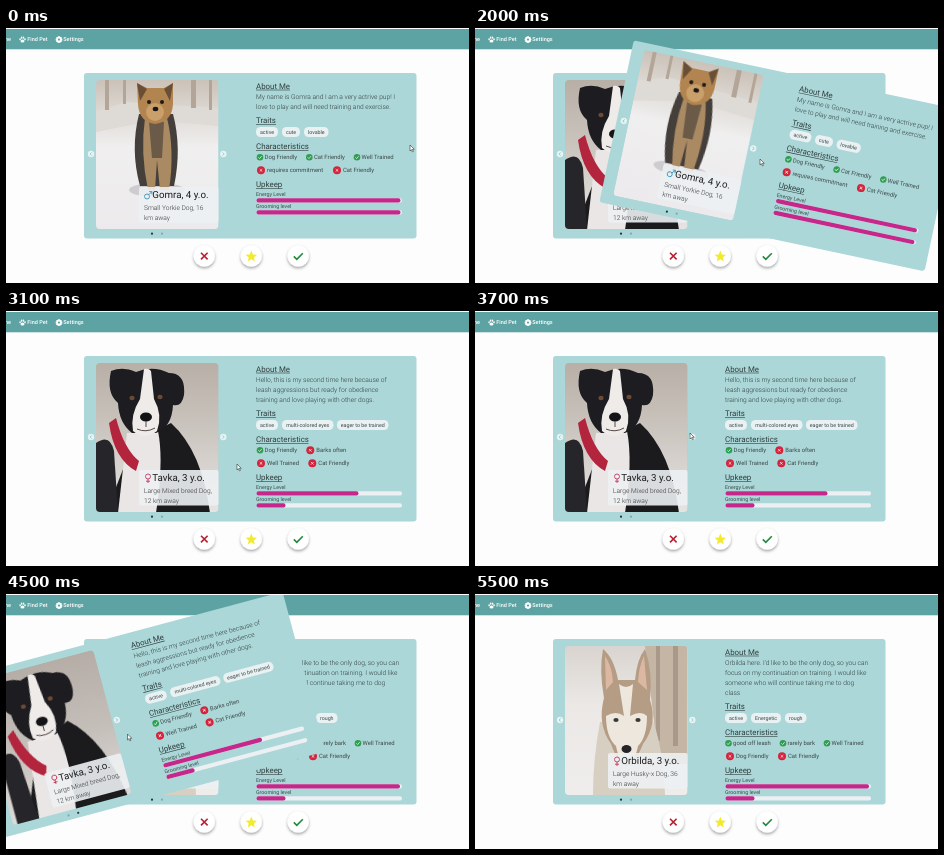
Animation, 463 px wide and 255 px high, one loop 5700 ms. Source, as an HTML page:

```html
<!DOCTYPE html>
<html lang="en">
<head>
<meta charset="utf-8">
<title>Pet cards</title>
<style>
  html, body { margin: 0; width: 100%; height: 100%; overflow: hidden; background: #fdfdfd; }
  svg { display: block; width: 463px; height: 255px; }
  text { font-family: Roboto, Arial, sans-serif; fill: #3b4848; text-rendering: geometricPrecision; }
  .nav { font-size: 5.5px; font-weight: 500; fill: #fff; }
  .head { font-size: 7.9px; fill: #2f3d3d; }
  .body { font-size: 6.63px; font-weight: 300; fill: #2f3d3d; }
  .pill { font-size: 5.3px; }
  .fact { font-size: 5.9px; }
  .level { font-size: 5.3px; }
  .name { font-size: 9.75px; fill: #1c1c1c; }
  .info { font-size: 6.63px; font-weight: 300; fill: #333; }
</style>
</head>
<body>
<svg id="stage" viewBox="0 0 463 255" xmlns="http://www.w3.org/2000/svg"></svg>
<script>
const LOOP = 5700, STEP = 100;

const pets = [
  {
    id: 'a', name: 'Gomra', age: 4, male: true, info: ['Small Yorkie Dog, 16', 'km away'],
    about: ['My name is Gomra and I am a very actrive pup! I', 'love to play and will need training and exercise.'],
    traits: [['active', 250, 22], ['cute', 276, 18], ['lovable', 298, 24.5]],
    facts: [
      [['Dog Friendly', 254, 1], ['Cat Friendly', 303.3, 1], ['Well Trained', 351, 1]],
      [['requires commitment', 255, 0], ['Cat Friendly', 331, 0]]
    ],
    levels: [144, 144]
  },
  {
    id: 'b', name: 'Tavka', age: 3, info: ['Large Mixed breed Dog,', '12 km away'],
    about: ['Hello, this is my second time here because of', 'leash aggressions but ready for obedience', 'training and love playing with other dogs.'],
    traits: [['active', 250, 22], ['multi-colored eyes', 276, 51.5], ['eager to be trained', 331, 51.5]],
    facts: [
      [['Dog Friendly', 254, 1], ['Barks often', 304.3, 0]],
      [['Well Trained', 255, 0], ['Cat Friendly', 306.3, 0]]
    ],
    levels: [102, 29]
  },
  {
    id: 'c', name: 'Orbilda', age: 3, info: ['Large Husky-x Dog, 36', 'km away'],
    about: ["Orbilda here. I'd like to be the only dog, so you can", 'focus on my continuation on training. I would like', 'someone who will continue taking me to dog', 'class'],
    traits: [['active', 250, 22], ['Energetic', 276, 30], ['rough', 310, 21.5]],
    facts: [
      [['good off leash', 253.5, 1], ['rarely bark', 308, 1], ['Well Trained', 352, 1]],
      [['Dog Friendly', 255, 0], ['Cat Friendly', 307, 0]]
    ],
    levels: [143.5, 29]
  }
];

// Motion tables: time followed by values, linear in between.
const cursorPath = [
  [0, 404, 117], [300, 388, 124], [600, 371, 128], [700, 340, 124], [800, 260, 110], [900, 183, 104],
  [1000, 188, 110], [1100, 225, 128], [1200, 252, 138], [1300, 233, 137], [1600, 227, 134], [1800, 227, 134],
  [1900, 234, 134], [2000, 285, 131], [2100, 355, 125], [2200, 409, 121], [2400, 418, 118], [2600, 395, 125],
  [2800, 310, 140], [3000, 237, 148], [3100, 231, 153], [3300, 228, 148], [3500, 219, 130], [3700, 215, 122],
  [3800, 215, 122], [3900, 226, 132], [4100, 246, 146], [4300, 234, 149], [4400, 226, 149], [4500, 121.5, 140],
  [4700, 85, 128], [5000, 50, 70], [5200, 16, 10]
];
const throwRight = [
  [1800, 0, 0, 0], [1900, 6, 0, 4], [2000, 60, 0, 12], [2100, 160, -20, 17], [2200, 258.5, -44.5, 17],
  [2300, 312, -56, 17], [2400, 358, -66, 17], [2500, 415, -78, 17]
];
const throwLeft = [
  [4200, 0, 0, 0], [4300, -1, 1, -1], [4400, -5, 4, -6], [4500, -107, -7, -15], [4600, -190, -20, -17],
  [4800, -295, -44, -17], [5000, -370, -62, -17], [5200, -430, -78, -17]
];
const slidePath = [[3800, 0], [3900, -32], [4000, -72], [4100, -99], [4200, -122]];

const text = (cls, x, y, str, extra = '') => `<text class="${cls}" x="${x}" y="${y}" ${extra}>${str}</text>`;
const rect = (x, y, w, h, r, fill) => `<rect x="${x}" y="${y}" width="${w}" height="${h}" rx="${r}" fill="${fill}"/>`;
const oval = (x, y, rx, ry, fill) => `<ellipse cx="${x}" cy="${y}" rx="${rx}" ry="${ry}" fill="${fill}"/>`;
const shape = (d, fill) => `<path d="${d}" fill="${fill}"/>`;
const line = (d, color, w) => `<path d="${d}" fill="none" stroke="${color}" stroke-width="${w}"/>`;
const fade = (id, ...stops) => `<linearGradient id="${id}" x2="0" y2="1">` +
  stops.map(([o, c]) => `<stop offset="${o}" stop-color="${c}"/>`).join('') + '</linearGradient>';

const blackDog =
  shape('M128 130L165 112Q196 140 204 202H100Z', '#1b1a1d') +
  shape('M121 122L152 120Q158 150 150 202H112Z', '#e9e6e5') +
  shape('M90 132Q104 122 108 140L112 202H90Z', '#26252a') +
  shape('M103 112L110 107Q118 138 133 150L130 160Q108 148 103 112Z', '#b3243d') +
  shape('M105 60Q117 55 130 61Q147 54 163 62Q180 62 178 84Q176 96 167 94Q166 116 150 122H126Q113 112 112 92Q100 82 105 60Z', '#1d1c20') +
  shape('M138 58Q143 57 145 60L148 88Q157 104 151 120Q139 130 127 120Q124 104 134 88Z', '#eeebe9') +
  oval(126, 87, 2.6, 2.2, '#6b4a35') + oval(154, 86, 2.6, 2.2, '#6b4a35') +
  oval(140, 106, 6, 4.5, '#141316') + line('M140 110V116M131 118Q140 122 149 117', '#55484a', 1);

const photos = {
  a: rect(90, 52, 122.5, 149, 0, 'url(#skyA)') +
    shape('M90 84L120 74L212 80V98L150 92L90 104Z', '#dedad5') +
    shape('M99 52h4v30h-4zM117 52h3v24h-3zM185 52h5v28h-5zM203 52h3v30h-3z', '#b3a698') +
    oval(151, 162, 28, 7, '#cfccd0') +
    shape('M133 86Q124 122 134 158H168Q176 120 167 86Z', '#453f3b') +
    shape('M139 90Q134 124 142 162H149L151 132L154 162H163Q169 122 161 90Z', '#a98a63') +
    shape('M143 94H158L156 130H146Z', '#6b5a48') +
    shape('M131 55L141 60H158L167 55L167 76Q166 94 149 96Q133 94 132 76Z', '#b18450') +
    shape('M131 55L141 61L134 73ZM167 55L158 61L164 73Z', '#6a4f38') +
    oval(149, 84, 9, 9, '#c9a06a') +
    oval(143, 74, 2, 2, '#211a17') + oval(156, 74, 2, 2, '#211a17') + oval(149.5, 81, 2.8, 2.2, '#1b1718'),
  b: rect(90, 52, 122.5, 149, 0, 'url(#skyB)') + blackDog,
  b2: rect(90, 52, 122.5, 149, 0, 'url(#skyB2)') + `<g transform="translate(4 2)">${blackDog}</g>`,
  c: rect(90, 52, 122.5, 149, 0, 'url(#skyC)') +
    shape('M170 52H212V170H184Z', '#c5b5a5') +
    shape('M181 52h4v95h-4zM198 52h5v100h-5z', '#a9998a') +
    shape('M125 128Q118 165 118 201H190Q188 150 176 122Z', '#d8cfc3') +
    shape('M128 55Q139 64 143 86H160Q162 65 170 55Q178 78 175 106Q183 130 168 150Q160 170 152 172Q143 170 136 150Q122 130 129 104Q124 76 128 55Z', '#b49d84') +
    shape('M130 62Q137 72 138 88L131 96ZM169 62Q164 72 163 88L172 96Z', '#dcb8a3') +
    shape('M144 90Q151 96 158 90L155 122Q166 116 172 122Q172 143 163 152Q160 168 152 170Q144 168 141 152Q131 143 131 122Q141 116 149 122Z', '#eee7de') +
    oval(141, 126, 2.6, 2, '#3a3837') + oval(163, 126, 2.6, 2, '#3a3837') +
    oval(151.5, 155, 5, 4, '#262326')
};

function badge(x, y, good) {
  const mark = good
    ? line(`M${x - 1.6} ${y}l1.2 1.3 2.1-2.5`, '#dff3e4', .8)
    : line(`M${x - 1.3} ${y - 1.3}l2.6 2.6m0-2.6l-2.6 2.6`, '#fbe3e6', .8);
  const r = good ? 3.3 : 4;
  return oval(x, y, r, r, good ? '#2f9e50' : '#d3243c') + mark;
}

function arrow(x, dir) {
  return oval(x, 126, 3.2, 3.2, '#e6f3f3') + line(`M${x - dir * .7} 124.4l${dir * 1.6} 1.6l${-dir * 1.6} 1.6`, '#8fb9b9', .7);
}

function heading(str, y, w) {
  return text('head', 250, y, str) + rect(250, y + 1.2, w, .6, 0, '#2f3d3d');
}

function gender(male) {
  return male
    ? `<circle cx="141" cy="168.5" r="2.5" fill="none" stroke="#3d94b5" stroke-width=".9"/>` + line('M142.8 166.7L145.8 163.7M143.2 163.6H145.9V166.3', '#3d94b5', .9)
    : `<circle cx="142" cy="165.5" r="2.5" fill="none" stroke="#c23a5e" stroke-width=".9"/>` + line('M142 168V172M140 170.2H144', '#c23a5e', .9);
}

function card(p) {
  const shift = (p.about.length - 2) * 10;
  const strip = p.id === 'b' ? photos.b + `<g transform="translate(122.5 0)">${photos.b2}</g>` : photos[p.id];
  const details =
    heading('Traits', 95, 20) +
    p.traits.map(([s, x, w]) => rect(x, 99, w, 10, 4.5, '#e9f1f2') + text('pill', x + w / 2, 105.8, s, 'text-anchor="middle"')).join('') +
    heading('Characteristics', 121, 52.5) +
    p.facts.map((row, i) => row.map(([s, x, ok]) => {
      const y = 129.3 + i * 13;
      return badge(x, y, ok) + text('fact', x + (ok ? 4.6 : 6), y + 2, s);
    }).join('')).join('') +
    heading('Upkeep', 159, 26.5) +
    ['Energy Level', 'Grooming level'].map((s, i) => {
      const y = 168.3 + i * 12;
      return text('level', 250, y, s) + rect(250.5, y + 1.9, 145.5, 4.2, 2, '#edf0f3') +
        rect(250.5, y + 1.9, p.levels[i], 4.2, 2, '#c5288a');
    }).join('');
  return `<g id="card-${p.id}">` + rect(78, 45, 332.5, 165.5, 3, '#acd7d8') +
    `<g clip-path="url(#frame)"><g id="strip-${p.id}" filter="url(#soft)">${strip}</g></g>` +
    rect(133, 159, 79.5, 35.5, 2, 'rgba(238,241,243,.9)') + gender(p.male) +
    text('name', 146.3, 170.3, `${p.name}, ${p.age} y.o.`) +
    p.info.map((s, i) => text('info', 138, 181.8 + i * 9.8, s)).join('') +
    arrow(85, -1) + arrow(217.3, 1) +
    `<circle id="dot1-${p.id}" cx="146" cy="205.7" r="1.1" fill="#25343a"/>` +
    `<circle id="dot2-${p.id}" cx="156" cy="205.7" r="1.1" fill="#7fa9b8"/>` +
    heading('About Me', 60.5, 34) +
    p.about.map((s, i) => text('body', 250, 71 + i * 10, s)).join('') +
    `<g transform="translate(0 ${shift})">${details}</g></g>`;
}

function star(x, y, r) {
  const pts = Array.from({ length: 10 }, (_, i) => {
    const a = -Math.PI / 2 + i * Math.PI / 5, d = i % 2 ? r * .45 : r;
    return `${x + d * Math.cos(a)},${y + d * Math.sin(a)}`;
  });
  return `<polygon points="${pts.join(' ')}" fill="#f1ea2f"/>`;
}

const gear = Array.from({ length: 8 }, (_, i) =>
  `<rect x="52.2" y="8.4" width="1.6" height="6.4" fill="#fff" transform="rotate(${i * 45} 53 11.6)"/>`).join('');

const header = rect(0, 1, 463, 20.3, 0, '#5ea3a3') +
  text('nav', 5, 13.4, 'Home', 'text-anchor="end"') +
  oval(16.5, 13, 2, 1.6, '#fff') + oval(14.1, 11.2, .8, 1, '#fff') + oval(15.6, 9.7, .8, 1.1, '#fff') +
  oval(17.5, 9.7, .8, 1.1, '#fff') + oval(19, 11.2, .8, 1, '#fff') +
  text('nav', 21.3, 13.4, 'Find Pet') +
  gear + oval(53, 11.6, 2.5, 2.5, '#fff') + oval(53, 11.6, 1.1, 1.1, '#5ea3a3') +
  text('nav', 57.3, 13.4, 'Settings');

const buttons = [198.3, 245.3, 292.2].map(x => `<g filter="url(#lift)">${oval(x, 228, 10.6, 10.6, '#fff')}</g>`).join('') +
  line('M195 224.8l6.6 6.6m0-6.6l-6.6 6.6', '#b81f30', 1.6) + star(245.3, 228.6, 6) +
  line('M287.8 228.4l3 3l6-6.2', '#1f8a3a', 1.6);

const stage = document.getElementById('stage');
stage.innerHTML = '<defs>' +
  fade('skyA', [0, '#cbc2b8'], [.25, '#e0dcd8'], [.45, '#f0efef'], [1, '#eceaec']) +
  fade('skyB', [0, '#b8afa6'], [.45, '#cbc5bf'], [1, '#e6e4e3']) +
  fade('skyB2', [0, '#b5ada6'], [.5, '#c4beb9'], [1, '#dedad7']) +
  fade('skyC', [0, '#d9d4cf'], [.4, '#ebe8e6'], [1, '#efedec']) +
  `<clipPath id="frame">${rect(90, 52, 122.5, 149, 4, '#000')}</clipPath>
  <filter id="soft" x="0" y="0" width="1" height="1"><feGaussianBlur stdDeviation=".7"/></filter>
  <filter id="lift" x="-.4" y="-.4" width="1.8" height="1.9"><feDropShadow dx="0" dy="1.6" stdDeviation="1.8" flood-opacity=".38"/></filter>
  </defs>` +
  rect(0, 0, 463, 255, 0, '#fdfdfd') + header +
  [...pets].reverse().map(card).join('') + buttons + rect(0, 0, 463, 1, 0, '#fdfdfd') +
  `<path id="cursor" d="M0 0V6l1.4-1.3 1 2.2 1-.45-1-2.15H4.3Z" fill="#fff" stroke="#333" stroke-width=".6"/>`;

const $ = id => document.getElementById(id);
const show = (id, on) => $(id).setAttribute('display', on ? 'inline' : 'none');
const move = (id, value) => $(id).setAttribute('transform', value);

function at(table, t) {
  const i = table.findIndex(row => row[0] > t);
  if (i === 0) return table[0].slice(1);
  if (i < 0) return table[table.length - 1].slice(1);
  const a = table[i - 1], b = table[i], k = (t - a[0]) / (b[0] - a[0]);
  return a.slice(1).map((v, n) => v + (b[n + 1] - v) * k);
}

function swing(id, table, t) {
  const [x, y, r] = at(table, t);
  move(id, `translate(${x} ${y}) rotate(${r} 244 127.5)`);
}

function draw(t) {
  swing('card-a', throwRight, t);
  swing('card-b', throwLeft, t);
  show('card-a', t < 2500);
  show('card-b', t > 1800 && t < 5200);
  show('card-c', t > 4200);
  move('strip-b', `translate(${at(slidePath, t)[0]} 0)`);
  const second = t >= 3900;
  $('dot1-b').setAttribute('fill', second ? '#7fa9b8' : '#25343a');
  $('dot2-b').setAttribute('fill', second ? '#25343a' : '#7fa9b8');
  move('cursor', `translate(${at(cursorPath, t).join(' ')})`);
  show('cursor', t < 5500);
}

const start = performance.now();
function tick() {
  const t = (performance.now() - start) % LOOP;
  draw(Math.floor(t / STEP) * STEP);
  requestAnimationFrame(tick);
}
tick();
</script>
</body>
</html>
```
